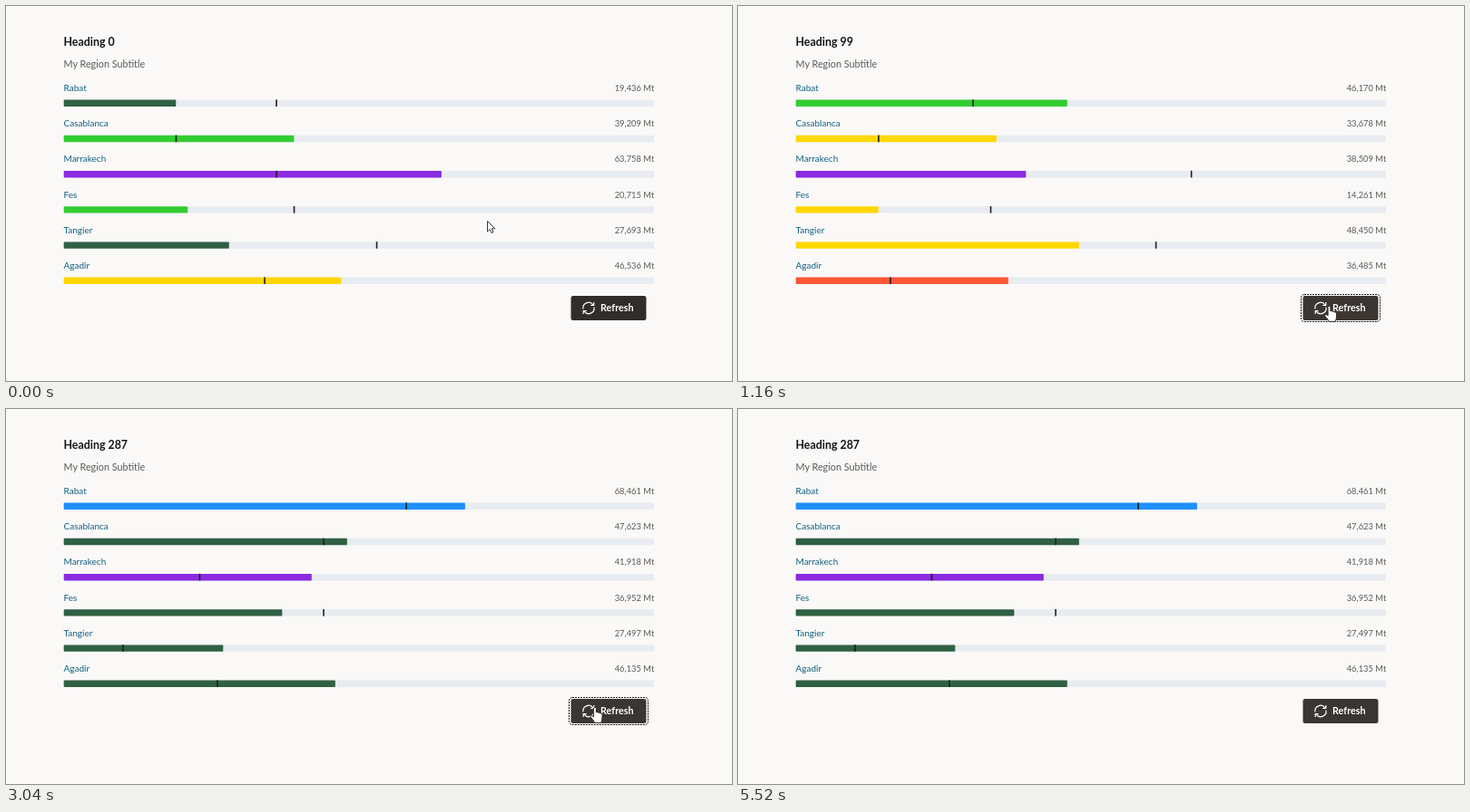
These frames come from a looping animation (800x414 px, 5.96 s). An HTML page:

```html
<!DOCTYPE html>
<html lang="en">
<head>
<meta charset="utf-8">
<title>City meters</title>
<style>
  html, body { margin: 0; width: 100%; height: 100%; overflow: hidden; background: #faf9f8; }
  svg { display: block; width: 100vw; height: 100vh; font-family: Lato, "Open Sans", sans-serif; }
  .heading { font-size: 12.4px; font-weight: 700; fill: #161513; }
  .subtitle { font-size: 10.8px; fill: #5c5956; }
  .label { font-size: 10px; fill: #12607f; }
  .value { font-size: 9.4px; fill: #5c5956; text-anchor: end; }
  .caption { font-size: 10.8px; font-weight: 700; fill: #fff; }
</style>
</head>
<body>
<svg id="stage" viewBox="0 0 800 414">
  <text class="heading" id="heading" x="63.5" y="43.6"></text>
  <text class="subtitle" x="63.5" y="68">My Region Subtitle</text>
  <g id="rows"></g>
  <rect id="button" x="622.5" y="320" width="83" height="27" rx="2.5"/>
  <rect id="focus" x="620.5" y="318.5" width="87" height="30" rx="3.5" fill="none" stroke="#161513" stroke-dasharray="2 1"/>
  <g transform="translate(642 333.5)" fill="none" stroke="#fff" stroke-width="1.2">
    <g id="arc"><path d="M-6 1A6 6 0 0 1 4.8-3.6M5.8-6.6V-3H2.2"/></g>
    <use href="#arc" transform="rotate(180)"/>
  </g>
  <text class="caption" x="655" y="337.3">Refresh</text>
  <g id="cursor" stroke-linejoin="round">
    <path id="arrow" d="M.5 .5V12L3.2 9.5 5 13.5 7 12.6 5.2 8.8H8.8Z" fill="#fff" stroke="#222" stroke-width=".9"/>
    <path id="hand" d="M-1.4 1Q0-.7 1.4 1V6Q3 4.8 3.8 6.4 5.3 5.6 6 7.1 7.9 6.6 8 8.4V12Q8 14.5 6.6 17.5H-.3Q-1.5 14.5-4.5 11.5-5.4 9.3-3.4 9.3L-1.4 11Z" fill="#fff" stroke="#222" stroke-width=".9"/>
  </g>
</svg>
<script>
const LOOP = 5960, LEFT = 63.7, WIDTH = 650.3;
const cities = ["Rabat", "Casablanca", "Marrakech", "Fes", "Tangier", "Agadir"];
const pine = "#306043", lime = "#32cd32", violet = "#8a2be2",
      gold = "#ffd700", red = "#fb5735", blue = "#1e90ff";

// Each row: value, target percentage, bar colour
const states = [
  { at: 0, count: 0, rows: [[19436, 36, pine], [39209, 19, lime], [63758, 36, violet],
    [20715, 39, lime], [27693, 53, pine], [46536, 34, gold]] },
  { at: 1000, count: 99, rows: [[46170, 30, lime], [33678, 14, gold], [38509, 67, violet],
    [14261, 33, gold], [48450, 61, gold], [36485, 16, red]] },
  { at: 2960, count: 287, rows: [[68461, 58, blue], [47623, 44, pine], [41918, 23, violet],
    [36952, 44, pine], [27497, 10, pine], [46135, 26, pine]] }
];

// Pointer stops: time, x, y
const path = [[0, 530, 237], [40, 533, 239], [240, 612.5, 303.5], [400, 640, 324], [560, 651.5, 331],
  [1640, 651.5, 331], [1800, 649, 329], [3200, 649, 329], [3440, 303, -20], [LOOP, 303, -20]];

const $ = id => document.getElementById(id);
function add(parent, tag, attrs) {
  const el = document.createElementNS("http://www.w3.org/2000/svg", tag);
  for (const key in attrs) el.setAttribute(key, attrs[key]);
  return parent.appendChild(el);
}
const place = percent => LEFT + WIDTH * percent / 100;
const show = (el, on) => el.setAttribute("visibility", on ? "visible" : "hidden");

const meters = cities.map((city, i) => {
  const y = i * 39.2, group = $("rows");
  const bar = { x: LEFT, y: 103.6 + y, height: 7.4, rx: 0.8 };
  add(group, "text", { class: "label", x: 63.5, y: 94 + y }).textContent = city;
  const value = add(group, "text", { class: "value", x: 714.3, y: 94 + y });
  add(group, "rect", { ...bar, width: WIDTH, fill: "#e8ebef" });
  return {
    value,
    fill: add(group, "rect", bar),
    mark: add(group, "rect", { y: 103.4 + y, width: 1.6, height: 7.6, fill: "#211e1c" })
  };
});

let current;
function setState(state) {
  if (state === current) return;
  current = state;
  $("heading").textContent = "Heading " + state.count;
  state.rows.forEach(([value, target, color], i) => {
    const m = meters[i];
    m.value.textContent = value.toLocaleString("en-US") + " Mt";
    m.fill.setAttribute("width", WIDTH * Math.round(value / 1000) / 100);
    m.fill.setAttribute("fill", color);
    m.mark.setAttribute("x", place(target) - 0.6);
  });
}

function pointerAt(t) {
  const i = path.findIndex(stop => stop[0] > t);
  const [t0, x0, y0] = path[i - 1], [t1, x1, y1] = path[i];
  const p = (t - t0) / (t1 - t0);
  return [x0 + (x1 - x0) * p, y0 + (y1 - y0) * p];
}

function draw(t) {
  setState(states.filter(s => s.at <= t).pop());
  const [x, y] = pointerAt(t);
  const over = x >= 622.5 && y >= 320;
  $("cursor").setAttribute("transform", `translate(${x} ${y})`);
  show($("cursor"), t < 3440);
  show($("hand"), over && t < 3440);
  show($("arrow"), !over && t < 3440);
  show($("focus"), t >= 560 && t < 5520);
  $("button").setAttribute("fill", over || t > 560 ? "#3b3632" : "#312d2a");
}

const start = performance.now();
function tick() {
  const t = (performance.now() - start) % LOOP;
  draw(Math.floor(t / 40) * 40);
  requestAnimationFrame(tick);
}
tick();
</script>
</body>
</html>
```
